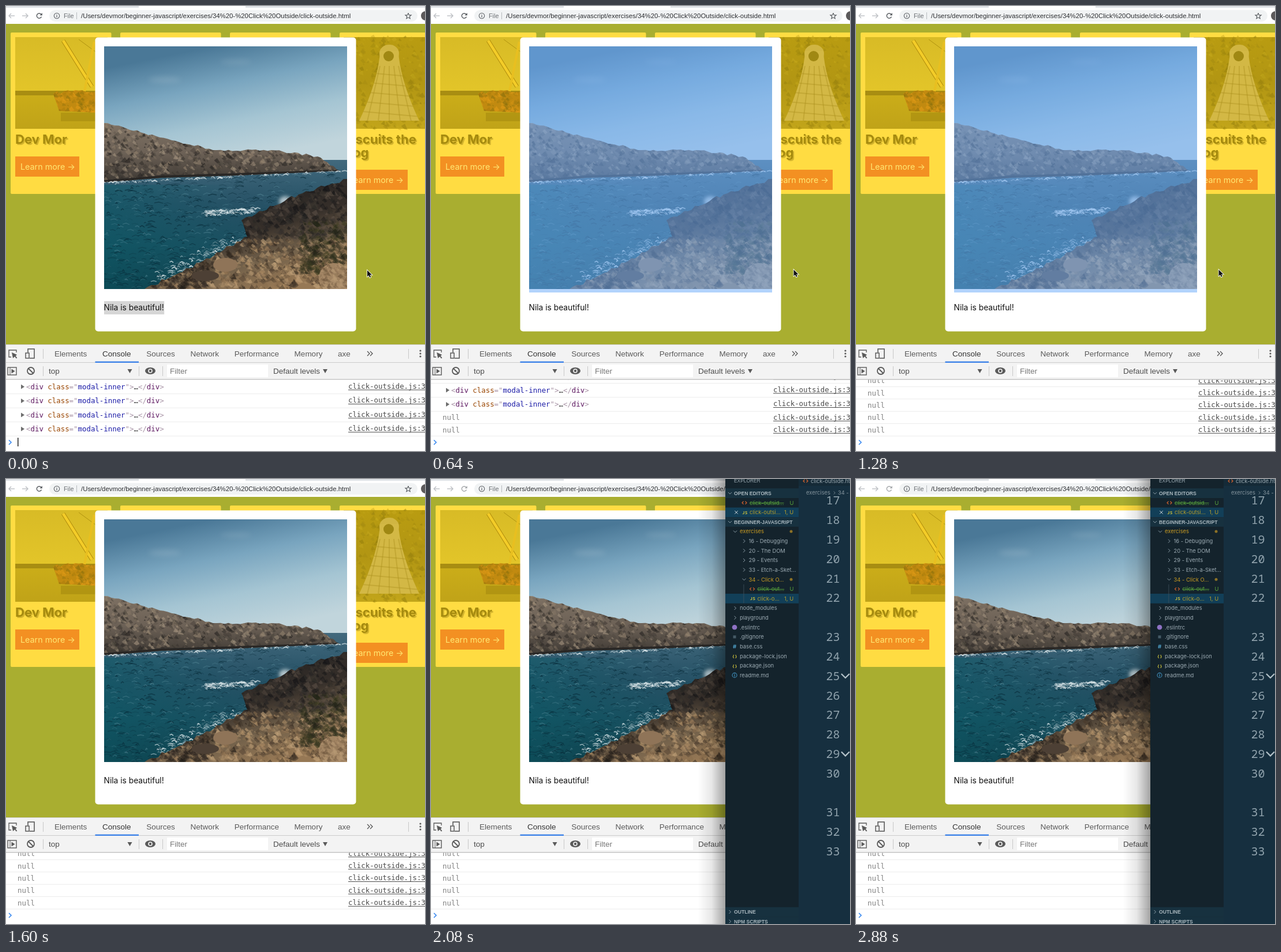
Write an HTML page with a canvas that moves like this. It is 726 px wide and 772 px high and loops after 3.04 s.

```html
<!DOCTYPE html>
<html lang="en">
<head>
<meta charset="utf-8">
<title>Click outside</title>
<style>
html, body { margin: 0; width: 100%; height: 100%; overflow: hidden; background: #fff; }
canvas { display: block; }
</style>
</head>
<body>
<canvas id="stage" width="726" height="772"></canvas>
<script>
const W = 726, H = 772, LOOP = 3040, STEP = 160;
const UI = '"Liberation Sans", Arial, sans-serif';
const INTER = 'Inter, sans-serif';
const MONO = '"DejaVu Sans Mono", monospace';
const CODE = '"Noto Sans Mono", monospace';
const CAPTION = 'Nila is beautiful!';

const stage = document.getElementById('stage').getContext('2d');
let c = stage;

function layer(draw) {
  const el = document.createElement('canvas');
  el.width = W;
  el.height = H;
  c = el.getContext('2d');
  draw();
  c = stage;
  return el;
}

let seed = 7;
function rnd(lo = 0, hi = 1) {
  seed = (seed * 16807) % 2147483647;
  return lo + (hi - lo) * seed / 2147483647;
}

function rect(x0, y0, x1, y1, color, radius = 0) {
  c.fillStyle = color;
  c.beginPath();
  c.roundRect(x0, y0, x1 - x0, y1 - y0, radius);
  c.fill();
}

// Text with y at the middle of the capitals; returns the right edge.
function text(s, x, y, size, color, family = UI, weight = 400) {
  c.font = `${weight} ${size}px ${family}`;
  c.fillStyle = color;
  c.fillText(s, x, y + size * 0.36);
  return x + c.measureText(s).width;
}

function trace(points) {
  c.beginPath();
  for (const [x, y] of points) c.lineTo(x, y);
}

function poly(points, fill) {
  trace(points);
  c.fillStyle = fill;
  c.fill();
}

function line(points, color, width = 1) {
  trace(points);
  c.strokeStyle = color;
  c.lineWidth = width;
  c.stroke();
}

function frame(x, y, w, h, color, width) {
  c.strokeStyle = color;
  c.lineWidth = width;
  c.strokeRect(x, y, w, h);
}

function oval(x, y, rx, ry, color) {
  c.beginPath();
  c.ellipse(x, y, rx, ry, 0, 0, 7);
  c.fillStyle = color;
  c.fill();
}

const dot = (x, y, r, color) => oval(x, y, r, r, color);

function ring(x, y, r, color, width = 1, from = 0, to = 6.284) {
  c.beginPath();
  c.arc(x, y, r, from, to);
  c.strokeStyle = color;
  c.lineWidth = width;
  c.stroke();
}

// Angle mark whose tip sits at (x, y), pointing along (dx, dy).
function chevron(x, y, dx, dy, s, color, width = 1) {
  line([[x - s * (dx + dy), y - s * (dy + dx)], [x, y], [x - s * (dx - dy), y - s * (dy - dx)]], color, width);
}

const cross = (x, y, r, color, width) => {
  line([[x - r, y - r], [x + r, y + r]], color, width);
  line([[x + r, y - r], [x - r, y + r]], color, width);
};

const triangleDown = (x, y, color) => poly([[x - 4, y - 3], [x + 4, y - 3], [x, y + 4]], color);
const triangleRight = (x, y, color) => poly([[x - 3, y - 4], [x + 3, y], [x - 3, y + 4]], color);

function fade(x0, y0, x1, y1, ...colors) {
  const g = c.createLinearGradient(x0, y0, x1, y1);
  colors.forEach((col, i) => g.addColorStop(i / (colors.length - 1), col));
  return g;
}

function clipped(points, draw) {
  c.save();
  trace(points);
  c.clip();
  draw();
  c.restore();
}

// Broken rock edge running through a few key points.
function jagged(keys, amp) {
  const out = [keys[0]];
  for (let i = 1; i < keys.length; i++) {
    const [ax, ay] = keys[i - 1], [bx, by] = keys[i];
    const n = Math.ceil(Math.hypot(bx - ax, by - ay) / 7);
    for (let k = 1; k <= n; k++) {
      const j = k < n ? rnd(-amp, amp) : 0;
      out.push([ax + (bx - ax) * k / n, ay + (by - ay) * k / n + j]);
    }
  }
  return out;
}

function facets(n, x0, y0, x1, y1, size, ...colors) {
  for (let i = 0; i < n; i++) {
    const x = rnd(x0, x1), y = rnd(y0, y1), s = size * rnd(0.4, 1.4);
    c.globalAlpha = rnd(0.2, 0.6);
    poly([[x - s, y + s * rnd(-0.4, 0.6)], [x + s * rnd(-0.5, 0.5), y - s], [x + s, y + s * rnd()], [x, y + s * 0.7]],
      colors[Math.floor(rnd() * colors.length)]);
  }
  c.globalAlpha = 1;
}

function streaks(n, x0, y0, x1, y1, len, color, alpha) {
  for (let i = 0; i < n; i++) {
    const x = rnd(x0, x1), y = rnd(y0, y1), l = len * rnd(0.3, 1.3);
    c.globalAlpha = alpha * rnd();
    line([[x - l, y + rnd(0, 2)], [x, y - 1], [x + l, y + rnd(0, 2)]], color, rnd(0.8, 1.8));
  }
  c.globalAlpha = 1;
}

// Foam spread around a slanted line.
function foam(n, x0, y0, x1, y1, spread) {
  for (let i = 0; i < n; i++) {
    const k = rnd(), x = x0 + (x1 - x0) * k + rnd(-spread, spread), y = y0 + (y1 - y0) * k + rnd(-spread, spread) / 2;
    streaks(1, x, y, x, y, 4, '#dfeaed', 0.85);
  }
}

function seaside() {
  c.save();
  c.beginPath();
  c.rect(170, 70, 421, 421);
  c.clip();
  rect(170, 70, 591, 270, fade(360, 70, 400, 268, '#4a7897', '#79a5bf', '#a5c5d3', '#c1d5dc'));
  c.filter = 'blur(5px)';
  oval(275, 128, 28, 5, 'rgba(255,255,255,.13)');
  oval(398, 97, 28, 4, 'rgba(255,255,255,.1)');
  c.filter = 'none';

  rect(170, 267, 591, 491, fade(0, 267, 0, 491, '#42697d', '#275266', '#194f5f', '#123d49'));
  rect(170, 310, 400, 491, fade(170, 0, 400, 0, 'rgba(6,92,104,.45)', 'rgba(6,92,104,0)'));
  streaks(900, 170, 292, 591, 491, 6, '#092c3a', 0.75);
  streaks(420, 170, 292, 591, 491, 5, '#5d909f', 0.5);

  const ridge = [[170, 203], [240, 221], [300, 236], [365, 250], [460, 250], [540, 261], [578, 286]];
  const cliff = [...jagged(ridge, 2), [400, 294], [270, 298], [170, 306]];
  poly(cliff, fade(0, 205, 0, 305, '#7d7062', '#6c6156', '#3d3833'));
  clipped(cliff, () => {
    facets(1300, 170, 200, 580, 306, 4, '#211f1d', '#36312d', '#ab9a84', '#94836e', '#4a443b');
    line([[170, 304], [270, 296], [400, 292], [578, 286]], '#292725', 4);
  });
  foam(70, 170, 307, 400, 296, 3);
  foam(50, 400, 295, 591, 287, 3);
  foam(130, 345, 360, 430, 354, 9);
  foam(200, 275, 470, 400, 408, 22);
  c.filter = 'blur(3px)';
  oval(484, 339, 11, 9, 'rgba(225,235,238,.75)');
  c.filter = 'none';

  const edge = [[591, 300], [507, 327], [408, 372], [418, 400], [318, 455], [240, 491]];
  const shore = [...jagged(edge, 3), [591, 491]];
  poly(shore, fade(445, 330, 490, 480, '#2a2725', '#352e29', '#71604a', '#967855'));
  clipped(shore, () => {
    facets(650, 400, 300, 591, 405, 5, '#141416', '#252423', '#5c5046', '#3d3731');
    facets(900, 250, 405, 591, 491, 5, '#2a221b', '#b8966d', '#8a6e4e', '#c5a57c', '#4a3b2d');
    facets(260, 510, 375, 591, 465, 5, '#1d2014', '#2e301d', '#434124');
    facets(200, 250, 450, 350, 491, 5, '#231e1a', '#3b3129');
    oval(380, 449, 21, 12, '#8f7458');
    oval(345, 468, 24, 9, '#4d4035');
    oval(568, 472, 26, 26, '#a08362');
    facets(120, 545, 450, 591, 491, 4, '#b89a75', '#6f583f');
  });
  c.restore();
}

function craneCard() {
  rect(16, 54, 176, 213, fade(0, 54, 0, 150, '#d8bb26', '#e3c529'));
  rect(16, 152, 176, 213, fade(0, 152, 0, 213, '#cbad19', '#c0a318'));
  rect(16, 147, 176, 155, '#a88d12');
  line([[99, 60], [149, 140]], '#b18d0c', 7);
  line([[99, 60], [149, 140]], '#f3cc28', 5);
  line([[126, 58], [156, 80]], '#b0930f', 1);
  line([[153, 62], [136, 148]], '#e8bf20', 4);
  const hull = [...jagged([[82, 152], [120, 146], [156, 149]], 3), [156, 185], [92, 182]];
  poly(hull, '#c18a10');
  clipped(hull, () => facets(110, 80, 145, 156, 185, 4, '#8d720d', '#e69d18', '#a77b0b'));
  rect(95, 185, 156, 200, 'rgba(145,118,8,.35)');
}

function dogCard() {
  rect(585, 54, 726, 213, fade(0, 54, 0, 213, '#b99c11', '#b29613', '#c2a51a'));
  facets(300, 600, 54, 726, 213, 4, '#96800d', '#c7aa1d', '#a58c12');
  const half = k => 16 + 36 * k ** 1.6;
  const side = dir => Array.from({ length: 12 }, (_, i) => [664 + dir * half(i / 11), 78 + i * 11]);
  const blanket = [...side(-1), ...side(1).reverse()];
  oval(664, 82, 17, 15, '#d0b542');
  poly(blanket, '#d3b845');
  clipped(blanket, () => {
    for (let i = -2; i < 3; i++) line([[664 + i * 8, 104], [664 + i * 19, 200]], 'rgba(170,143,28,.4)', 2);
    for (let y = 118; y < 200; y += 17) line([[605, y - 4], [720, y + 6]], 'rgba(170,143,28,.4)', 2);
  });
  dot(663, 87, 9, '#a08813');
}

function title(s, x, y) {
  c.shadowColor = 'rgba(120,95,0,.35)';
  c.shadowOffsetX = c.shadowOffsetY = 2;
  c.shadowBlur = 1;
  text(s, x, y, 22, '#a58a0e', INTER, 700);
  c.shadowColor = 'transparent';
}

function button(x, y) {
  rect(x, y, x + 111, y + 35, '#f39022');
  text('Learn more →', x + 9, y + 18, 14.3, '#ffe873', INTER);
}

function info(x, y, r, color) {
  ring(x, y, r, color, 1.1);
  rect(x - 0.6, y - r * 0.2, x + 0.6, y + r * 0.6, color);
  rect(x - 0.6, y - r * 0.6, x + 0.6, y - r * 0.35, color);
}

function toolbar() {
  rect(0, 0, W, 31, '#fff');
  rect(0, 0, W, 3, '#dfe2e6');
  rect(230, 0, 415, 3, '#fff');
  for (const [x, dir] of [[5, -1], [38, 1]]) {
    line([[x, 17], [x - dir * 10, 17]], '#b9bcc0', 1.3);
    chevron(x, 17, dir, 0, 4, '#b9bcc0', 1.3);
  }
  rect(75, 7, 713, 27, '#f1f3f4', 10);
  info(88, 17, 4.7, '#5f6368');
  text('File', 100, 17, 10.8, '#6b6f73');
  rect(122, 11, 123, 23, '#b8bbbe');
  text('/Users/devmor/beginner-javascript/exercises/34%20-%20Click%20Outside/click-outside.html',
    130, 17, 11.4, '#2c2e31');
  const star = Array.from({ length: 11 }, (_, i) => {
    const r = i % 2 ? 2.3 : 5.4, a = i * Math.PI / 5 - Math.PI / 2;
    return [697 + r * Math.cos(a), 17.5 + r * Math.sin(a)];
  });
  line(star, '#55595d', 1.1);
  dot(727, 17, 8, '#5c5a5b');
}

function devtools() {
  const ink = '#5a5a5a';
  rect(0, 587, W, 648, '#f3f3f3');
  rect(0, 587, W, 588, '#d2d2d2');
  rect(0, 618, W, 619, '#cccccc');
  rect(0, 648, W, H, '#fff');

  line([[9, 609], [5, 609], [5, 597], [18, 597], [18, 601]], ink, 1.3);
  poly([[10, 601], [19, 605], [12, 611]], ink);
  line([[14, 605], [18.5, 611]], ink, 2);
  frame(38, 595, 11, 16, ink, 1.6);
  rect(33, 601, 41, 612, '#f3f3f3');
  frame(34, 602, 6, 9, ink, 1.5);
  for (const x of [64, 697]) rect(x, 595, x + 1, 612, '#c8c8c8');
  let x = 84;
  for (const s of ['Elements', 'Console', 'Sources', 'Network', 'Performance', 'Memory', 'axe']) {
    const active = s === 'Console';
    const end = text(s, x, 603, 13.5, active ? '#333' : ink);
    if (active) rect(x - 12.5, 616.5, end + 13.5, 619, '#4285e8');
    x = end + 26.7;
  }
  for (const tip of [630, 635]) chevron(tip, 603, 1, 0, 4, ink, 1.4);
  for (let i = -1; i < 2; i++) dot(718, 603 + i * 5, 1.6, ink);

  frame(3, 627, 15, 13, ink, 1.4);
  rect(6.5, 627, 7.5, 640, ink);
  triangleRight(12.5, 633.5, ink);
  ring(43, 633, 6, ink, 1.8);
  line([[39, 629], [47, 637]], ink, 1.8);
  for (const sep of [64, 230, 271]) rect(sep, 625, sep + 1, 642, '#c8c8c8');
  text('top', 74, 633, 13.5, '#4c4c4c');
  triangleDown(214.5, 633, ink);
  oval(250, 633, 9, 6, ink);
  dot(250, 633, 3.8, '#f3f3f3');
  dot(250, 633, 2.2, ink);
  rect(279, 622, 454, 644, '#fff');
  text('Filter', 284, 633, 13.5, '#777');
  triangleDown(text('Default levels', 463, 633, 13.5, '#4c4c4c') + 9, 633, ink);
  rect(0, 647, W, 648.5, '#c4c4c4');
  chevron(9, 757, 1, 0, 4, '#3f8cf0', 1.7);
}

const browser = layer(() => {
  rect(0, 31, W, 587, '#a9ae30');
  for (let x = 8; x < W; x += 190) rect(x, 46, x + 174.5, 326, '#ffdc42', 2);
  craneCard();
  dogCard();
  title('Dev Mor', 16, 231);
  title('Biscuits the', 585, 231);
  title('Dog', 585, 254);
  button(16, 261);
  button(585, 284);
  rect(154.5, 54.5, 606.5, 564.5, '#fff', 5);
  seaside();
  toolbar();
  devtools();
});

const editor = layer(() => {
  const side = '#14232c', head = '#17313f', active = '#123f58';
  const pale = '#9baab2', gold = '#c79a22', green = '#58a43c', olive = '#b39c2b', dim = '#84949d';
  const label = (s, x, y, color = pale) => text(s, x, y, 9.4, color, INTER);
  const tag = (s, x, y) => text(s, x, y, 7.8, '#d0c43d', CODE, 700);
  const fold = (x, y, open, color = '#8ea0aa', s = 3) =>
    open ? chevron(x, y + s / 2, 0, 1, s, color, s / 3) : chevron(x + s / 2, y, 1, 0, s, color, s / 3);
  const angle = (x, y) => {
    for (const dir of [-1, 1]) chevron(x + dir * 4, y, dir, 0, 2.5, '#d2622f', 1.2);
  };
  const htmlFile = (s, x, y) => {
    angle(x - 9, y);
    line([[x, y + 0.5], [label(s, x, y, green), y + 0.5]], green, 0.9);
    label('U', 621.5, y, green);
  };
  const jsFile = (s, x, y) => {
    rect(510, y - 8.3, 637, y + 8.3, active);
    tag('JS', x - 13, y);
    label(s, x, y, olive);
    label('1, U', 612, y, olive);
  };

  rect(462, 0, 510, H, fade(462, 0, 510, 0, 'rgba(0,0,0,0)', 'rgba(0,0,0,.09)', 'rgba(0,0,0,.36)'));
  rect(510, 0, 637, H, side);
  rect(637, 0, W, H, '#162f3f');
  rect(637, 0, W, 12, '#152a37');
  angle(649, 3.5);
  label('click-outside.html', 658, 4);
  const end = label('exercises', 650, 24, dim);
  fold(end + 7, 24, false, dim, 2.5);
  label('34 - Click Outside', end + 13, 24, dim);

  // The sidebar is one list of evenly spaced rows.
  const row = i => 24.6 + i * 16.62;
  const section = (s, y, open) => {
    rect(510, y - 8.3, 637, y + 8.3, head);
    fold(518, y, open);
    text(s, 525, y, 8.6, '#a9b7be', UI, 700);
  };
  const folder = (s, x, y, open) => {
    fold(x, y, open);
    label(s, x + 8, y, open ? gold : pale);
    if (open) dot(624, y, 2.5, '#8c7126');
  };
  text('EXPLORER', 525, 3, 8.4, pale);
  section('OPEN EDITORS', row(0), true);
  htmlFile('click-outsid…', 552, row(1));
  jsFile('click-outsi…', 552, row(2));
  cross(529, row(2), 2.7, '#d0d8dc', 1);
  section('BEGINNER-JAVASCRIPT', row(3), true);
  folder('exercises', 527, row(4), true);
  ['16 - Debugging', '20 - The DOM', '29 - Events', '33 - Etch-a-Sket…', '34 - Click O…']
    .forEach((s, i) => folder(s, 542.5, row(i + 5), i === 4));
  htmlFile('click-out…', 565.5, row(10));
  jsFile('click-o…', 565.5, row(11));
  rect(541.5, row(10) - 8, 542.3, row(11) + 8, '#40535e');
  folder('node_modules', 527, row(12), false);
  folder('playground', 527, row(13), false);
  ['.eslintrc', '.gitignore', 'base.css', 'package-lock.json', 'package.json', 'readme.md']
    .forEach((s, i) => label(s, 535, row(i + 14)));
  dot(526, row(14), 4.3, '#8e72c4');
  rect(523.5, row(15) - 2.5, 528.5, row(15) + 2.5, '#455a66');
  text('#', 523, row(16), 9.5, '#4d9ec6', INTER, 700);
  for (const i of [17, 18]) tag('{}', 521.5, row(i));
  info(526, row(19), 4, '#3f8fbc');
  section('OUTLINE', 751, false);
  section('NPM SCRIPTS', 767.6, false);

  // Lines 22 and 30 wrap, so each takes two rows.
  for (let n = 17, y = 37; n <= 33; n++, y += 33.83) {
    text(String(n), 684.5, y, 20, '#91a3ad', CODE);
    if (n === 25 || n === 29) fold(718, y, true, '#b4c2c9', 7);
    if (n === 22 || n === 30) y += 33.83;
  }
});

const TAG = [['<', '#a894a6'], ['div', '#5d1760'], [' '], ['class', '#994500'], ['="', '#a894a6'],
  ['modal-inner', '#1a1aa6'], ['">', '#a894a6'], ['…', '#333'], ['</', '#a894a6'], ['div', '#5d1760'], ['>', '#a894a6']];

// Log rows stack upwards from the prompt, newest at the bottom.
function logs(nulls) {
  c.save();
  c.beginPath();
  c.rect(0, 648.5, W, H);
  c.clip();
  for (let i = 0, y = 746; y > 648; i++) {
    const isNull = i < nulls, h = isNull ? 21.4 : 24.4, mid = y - h / 2;
    rect(0, y - 0.5, W, y + 0.5, '#ececec');
    if (isNull) {
      text('null', 20, mid, 12.4, '#808080', MONO);
    } else {
      triangleRight(29, mid, '#6e6e6e');
      let x = 35;
      for (const [s, color] of TAG) x = text(s, x, mid, 12.4, color, MONO);
    }
    const ly = mid - (isNull ? 0.5 : 1);
    text('click-outside.js:3', 593, ly, 12.35, '#4a4a4a', MONO);
    rect(593, ly + 6, W, ly + 7, '#4a4a4a');
    y -= h;
  }
  c.restore();
}

function pointer(x, y) {
  c.save();
  c.translate(x, y);
  trace([[0, 0], [0, 11], [2.5, 8.8], [4.3, 12.6], [6.2, 11.8], [4.5, 8], [8, 8]]);
  c.closePath();
  c.strokeStyle = '#fff';
  c.lineWidth = 1.6;
  c.stroke();
  c.fillStyle = '#111';
  c.fill();
  c.restore();
}

function draw(now) {
  const t = Math.floor(now % LOOP / STEP) * STEP;
  const coding = t >= 1760, clicked = t >= 480, selected = t >= 640 && t < 1600;
  c.drawImage(browser, 0, 0);

  const tone = coding ? '#a4a7aa' : '#55595d';
  ring(57.5, 17, 4.2, tone, 1.4, 0.4, 5.6);
  poly([[58.5, 16.3], [62.8, 16.3], [62.8, 12]], tone);

  if (!clicked) {
    c.font = `400 13.8px ${INTER}`;
    rect(170, 512, 170 + c.measureText(CAPTION).width, 535, '#d6d6d6');
    rect(20, 749, 21.5, 764, '#222');
  }
  text(CAPTION, 169.5, 523.5, 13.8, '#111', INTER);
  if (selected) rect(170, 70, 591, 497, 'rgba(115,175,250,.55)');
  logs(Math.floor(t / STEP) - 2);

  if (coding) {
    c.drawImage(editor, 0, 0);
    // The pointer swings in from the right and back out.
    const k = (t - 2400) / STEP;
    pointer(609.5 + 50 * k * k, 90);
  } else if (t < 1600) {
    const k = Math.min(1, t / 480);
    pointer(626 + 2.5 * k, 458.5 - k);
  }
}

function tick() {
  draw(performance.now());
  requestAnimationFrame(tick);
}
tick();
</script>
</body>
</html>
```
